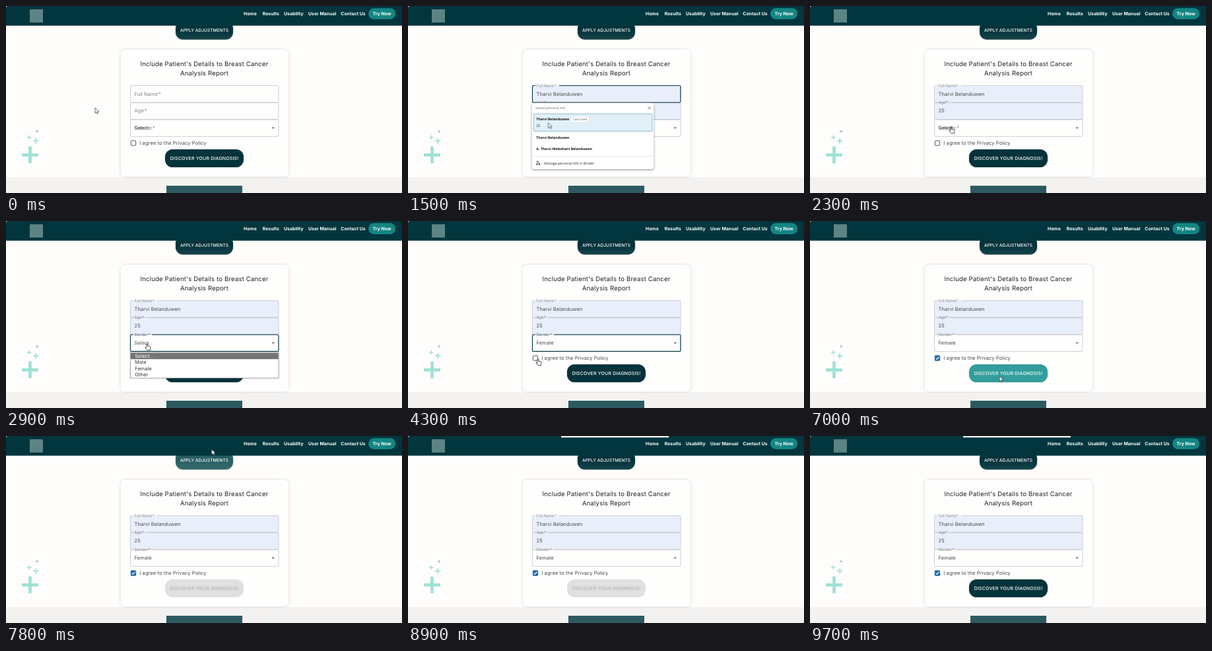
Write an HTML page that moves like this. It is 600 px wide and 283 px high and loops after 9800 ms.

```html
<!DOCTYPE html>
<html lang="en">
<head>
<meta charset="utf-8">
<title>Patient details form</title>
<style>
html, body { margin: 0; width: 100%; height: 100%; overflow: hidden; background: #fefdfb; }
svg { display: block; width: 600px; height: 283px; font: 7.6px Inter, sans-serif; text-rendering: geometricPrecision; }
.nav { font-size: 6.9px; font-weight: 700; fill: #fff; }
.title { font-size: 9.6px; letter-spacing: .16px; text-anchor: middle; fill: #222; }
.btn { text-anchor: middle; font-weight: 500; fill: #fff; }
.soft { filter: drop-shadow(0 .6px .8px #0004); }
.value { fill: #4c4c4c; letter-spacing: .06px; }
.line { fill: none; stroke: #c2c4ca; stroke-width: .8; }
.ring { fill: none; stroke: #0b3c45; stroke-width: 1.15; }
.label { fill: #858585; }
.saved { font: 5.2px "Open Sans", sans-serif; fill: #222; }
.saved .b { font-weight: 700; fill: #111; }

/* 1% of the loop is 98 ms */
.t { animation: 9.8s step-end infinite; opacity: 0; }
.name-empty { animation-name: nameEmpty; }
.name-focus { animation-name: nameFocus; }
.filled { animation-name: filled; }
.age-empty { animation-name: ageEmpty; }
.hover-row { animation-name: hoverRow; }
.popup { animation-name: nameFocus; }
.sex-empty { animation-name: sexEmpty; }
.sex-focus { animation-name: sexFocus; }
.select { animation-name: selectText; }
.female { animation-name: femaleText; }
.menu { animation-name: menu; }
.checked { animation-name: checked; }
.tab { animation-name: tab; }
.arrow { animation-name: arrow; }
.hand { animation-name: hand; }
.beam { animation-name: beam; }
@keyframes nameEmpty { 0% { opacity: 1 } 9.18%, 100% { opacity: 0 } }
@keyframes nameFocus { 0% { opacity: 0 } 9.18% { opacity: 1 } 21.43%, 100% { opacity: 0 } }
@keyframes filled { 0% { opacity: 0 } 11.73%, 100% { opacity: 1 } }
@keyframes ageEmpty { 0% { opacity: 1 } 11.73%, 100% { opacity: 0 } }
@keyframes hoverRow { 0% { opacity: 0 } 11.73% { opacity: 1 } 21.43%, 100% { opacity: 0 } }
@keyframes sexEmpty { 0% { opacity: 1 } 25.5%, 100% { opacity: 0 } }
@keyframes sexFocus { 0% { opacity: 0 } 25.5% { opacity: 1 } 46.94%, 100% { opacity: 0 } }
@keyframes selectText { 0% { opacity: 1 } 36.7%, 100% { opacity: 0 } }
@keyframes femaleText { 0% { opacity: 0 } 36.7%, 100% { opacity: 1 } }
@keyframes menu { 0% { opacity: 0 } 25.5% { opacity: 1 } 36.7%, 100% { opacity: 0 } }
@keyframes checked { 0% { opacity: 0 } 46.94%, 100% { opacity: 1 } }
@keyframes tab { 0% { opacity: 0 } 85.7%, 100% { opacity: 1 } }
@keyframes arrow {
  0% { opacity: 1 } 5.9% { opacity: 0 } 10.1% { opacity: 1 } 21.43% { opacity: 0 }
  31.8% { opacity: 1 } 41% { opacity: 0 } 48% { opacity: 1 } 49.9% { opacity: 0 }
  71.4% { opacity: 1 } 78.4% { opacity: 0 } 79.3%, 100% { opacity: 1 }
}
@keyframes hand {
  0% { opacity: 0 } 21.43% { opacity: 1 } 31.8% { opacity: 0 } 41% { opacity: 1 }
  48% { opacity: 0 } 49.9% { opacity: 1 } 71.4% { opacity: 0 } 78.4% { opacity: 1 } 79.3%, 100% { opacity: 0 }
}
@keyframes beam { 0% { opacity: 0 } 5.9% { opacity: 1 } 10.1%, 100% { opacity: 0 } }

/* highlighted menu row */
.mark { animation: mark 9.8s step-end infinite; }
@keyframes mark {
  0% { transform: none } 32.6% { transform: translateY(9.4px) } 33.7%, 100% { transform: translateY(18.8px) }
}

/* floating labels */
.label text { animation: 9.8s linear infinite; }
.label .l-name { animation-name: lName; }
.label .l-age { animation-name: lAge; }
.label .l-sex { animation-name: lSex; }
@keyframes lName {
  0%, 9.18% { transform: none } 11%, 100% { transform: translateY(-13.4px) scale(.76) }
}
@keyframes lAge {
  0%, 11.7% { transform: none } 13%, 100% { transform: translateY(-13.4px) scale(.76) }
}
@keyframes lSex {
  0%, 25.5% { transform: none; fill: #858585 }
  27.5%, 46.9% { transform: translateY(-13.4px) scale(.76); fill: #4a5f64 }
  48%, 100% { transform: translateY(-13.4px) scale(.76); fill: #858585 }
}

.apply { animation: apply 9.8s linear infinite; }
@keyframes apply { 0%, 78.2% { fill: #04333b } 79.4% { fill: #2c6266 } 81.6%, 100% { fill: #04333b } }
.go { animation: go 9.8s linear infinite; }
@keyframes go {
  0%, 49.9% { fill: #04333b } 52.4%, 71.4% { fill: #2f9c9b }
  74%, 95.9% { fill: #e0e0df } 98.4%, 100% { fill: #04333b }
}
.go-text { animation: goText 9.8s linear infinite; }
@keyframes goText { 0%, 71.4% { fill: #fff } 74%, 95.9% { fill: #b3b3b2 } 98.4%, 100% { fill: #fff } }
.go-shade { animation: goShade 9.8s linear infinite; }
@keyframes goShade { 0%, 71.4% { opacity: 1 } 74%, 95.9% { opacity: 0 } 98.4%, 100% { opacity: 1 } }

.pointer { animation: move 9.8s linear infinite; }
@keyframes move {
  0% { transform: translate(135px, 154px) }
  2.5% { transform: translate(137px, 153px) }
  7% { transform: translate(205px, 138px) }
  8.5%, 9.7% { transform: translate(214px, 136px) }
  11.7% { transform: translate(213px, 170px) }
  13%, 21.4% { transform: translate(212.5px, 176.5px) }
  24.5%, 30.2% { transform: translate(213px, 185px) }
  34.5% { transform: translate(211px, 220px) }
  37% { transform: translate(211px, 221px) }
  42%, 47.2% { transform: translate(196px, 208px) }
  50.5% { transform: translate(256px, 230px) }
  57%, 73% { transform: translate(287px, 234.5px) }
  78% { transform: translate(305px, 60px) }
  79.6% { transform: translate(311.5px, 20px) }
  81.3%, 100% { transform: translate(318px, -20px) }
}
</style>
</head>
<body>
<svg viewBox="0 0 600 283">
  <defs>
    <path id="name" d="M229 120.5H411.5Q413 120.5 413 122V144.5Q413 146 411.5 146H190Q188.5 146 188.5 144.5V122Q188.5 120.5 190 120.5H193"/>
    <path id="age" d="M213 146.3H411.5Q413 146.3 413 147.8V170.2Q413 171.7 411.5 171.7H190Q188.5 171.7 188.5 170.2V147.8Q188.5 146.3 190 146.3H193"/>
    <path id="sex" d="M221 172H411.5Q413 172 413 173.5V195.9Q413 197.4 411.5 197.4H190Q188.5 197.4 188.5 195.9V173.5Q188.5 172 190 172H193"/>
    <linearGradient id="sheen" x2="0" y2="1">
      <stop offset=".5" stop-color="#fff" stop-opacity="0"/>
      <stop offset="1" stop-color="#fff" stop-opacity=".08"/>
    </linearGradient>
  </defs>

  <rect width="600" height="283" fill="#fefdfb"/>
  <rect y="259" width="600" height="24" fill="#f3f2f1"/>
  <rect x="243" y="272" width="115" height="115" fill="#2c5a60"/>

  <g fill="none" stroke="#a0e2d5">
    <path d="M24 225.3H49M36.5 212.6V238" stroke-width="4.8"/>
    <path d="M41 204.2H49.5M45.2 200V208.5" stroke-width="1.8"/>
    <path d="M32 198.8H38.6M35.3 195.5V202.1" stroke-width="1.5"/>
    <path d="M45 189.8H49.4M47.2 187.6V192" stroke="#a3b5b3"/>
  </g>

  <g class="soft">
    <rect class="apply" x="257" y="23" width="87" height="27.8" rx="11"/>
    <rect x="257" y="23" width="87" height="27.8" rx="11" fill="url(#sheen)"/>
  </g>
  <text class="btn" x="300.5" y="39.3" font-size="6.6">APPLY ADJUSTMENTS</text>

  <path d="M0 3Q0 0 3 0H600V29.7H0Z" fill="#01363e"/>
  <rect x="36" y="5" width="20" height="20" fill="#5c8484"/>
  <g class="nav">
    <text x="360" y="14">Home</text>
    <text x="388.8" y="14">Results</text>
    <text x="421" y="14">Usability</text>
    <text x="458" y="14">User Manual</text>
    <text x="507.3" y="14">Contact Us</text>
    <rect x="549" y="3.2" width="41.3" height="16.8" rx="8.4" fill="#138683"/>
    <text x="569.6" y="14" text-anchor="middle">Try Now</text>
  </g>
  <rect class="t tab" x="232" width="163" height="2.3" fill="#f0f0f0"/>

  <rect x="173.5" y="66" width="255" height="192.3" rx="7" fill="#fefefd" style="filter:drop-shadow(0 .5px 1.5px #0003)"/>
  <text class="title" x="300.5" y="90.8">Include Patient's Details to Breast Cancer</text>
  <text class="title" x="300.5" y="105.4">Analysis Report</text>

  <rect class="t filled" x="188.5" y="120.5" width="224.5" height="51.2" rx="1.5" fill="#e8eefa"/>
  <g class="line">
    <use href="#name"/><use href="#age"/><use href="#sex"/>
    <path class="t name-empty" d="M193 120.5H229"/>
    <path class="t age-empty" d="M193 146.3H213"/>
    <path class="t sex-empty" d="M193 172H221"/>
  </g>
  <use class="t ring name-focus" href="#name"/>
  <use class="t ring sex-focus" href="#sex"/>
  <g class="label">
    <g transform="translate(194.5 135.7)"><text class="l-name">Full Name<tspan dx="1">*</tspan></text></g>
    <g transform="translate(194.5 161.4)"><text class="l-age">Age<tspan dx="1">*</tspan></text></g>
    <g transform="translate(194.5 187.2)"><text class="l-sex">Gender<tspan dx="1">*</tspan></text></g>
  </g>
  <g class="value">
    <text class="t filled" x="194.5" y="135.5">Tharvi Belanduwen</text>
    <text class="t filled" x="194.5" y="161.4">25</text>
    <text class="t select" x="194.5" y="187.2" font-size="7.3">Select...</text>
    <text class="t female" x="194.5" y="187.2">Female</text>
    <text x="202.3" y="210">I agree to the Privacy Policy</text>
  </g>
  <path d="M402.5 183.6H407.1L404.8 186Z" fill="#666"/>

  <rect x="189.4" y="203.9" width="7.2" height="7.2" rx=".8" fill="#fff" stroke="#555"/>
  <g class="t checked">
    <rect x="188.9" y="203.4" width="8.2" height="8.2" rx="1" fill="#1b6fb8"/>
    <path d="M190.7 207.6L192.3 209.2L195.6 205.6" fill="none" stroke="#fff" stroke-width="1.1"/>
  </g>

  <g class="go-shade"><rect class="soft" x="241.5" y="217.5" width="118" height="26.3" rx="11" fill="#04333b"/></g>
  <rect class="go" x="241" y="217" width="119" height="27" rx="11.5"/>
  <text class="btn go-text" x="300.7" y="232.9" font-size="7" letter-spacing=".18">DISCOVER YOUR DIAGNOSIS!</text>

  <g class="t menu">
    <rect class="soft" x="188.7" y="199.2" width="224.3" height="38.6" fill="#fff" stroke="#888" stroke-width=".6"/>
    <rect class="mark" x="189" y="199.7" width="223.7" height="9.4" fill="#757575"/>
    <g fill="#333" font-size="7.4" letter-spacing=".08">
      <text x="195.3" y="207" fill="#fff">Select...</text>
      <text x="195.3" y="216.3">Male</text>
      <text x="195.3" y="225.7">Female</text>
      <text x="195.3" y="235">Other</text>
    </g>
  </g>

  <g class="t popup saved">
    <rect x="187.5" y="146.8" width="185" height="100.2" rx="3.5" fill="#fff" style="filter:drop-shadow(0 1px 1.5px #0007)"/>
    <text x="193.3" y="156.2" font-size="4.9" fill="#666">Saved personal info</text>
    <path d="M363.7 152.4L367.7 156.4M367.7 152.4L363.7 156.4" stroke="#444" stroke-width=".7"/>
    <rect class="t hover-row" x="190.4" y="163.3" width="179.6" height="26.2" rx="1" fill="#e1f0f8" stroke="#72aecb" stroke-width=".8"/>
    <text class="b" x="194.3" y="173.3">Tharvi Belanduwen</text>
    <rect x="247" y="167" width="27.6" height="9" rx="4.5" fill="#fff" stroke="#ddd" stroke-width=".5"/>
    <text x="260.8" y="173.2" font-size="4.6" text-anchor="middle" fill="#555">Last Used</text>
    <text x="194.3" y="183">25</text>
    <text class="b" x="194.3" y="200.7">Tharvi Belanduwen</text>
    <text class="b" x="194.3" y="218.3">A. Tharvi Meloshani Belanduwen</text>
    <path d="M188 227.5H372" stroke="#dedede" stroke-width=".7"/>
    <g fill="none" stroke="#333" stroke-width=".8">
      <circle cx="196.4" cy="235.9" r="1.4"/>
      <path d="M197 240.4H194.2Q193.9 238.6 195.6 238.5H197"/>
      <circle cx="199" cy="239.3" r="1" fill="#333"/>
    </g>
    <text x="206" y="239.7">Manage personal info in Binder</text>
  </g>

  <g class="pointer" stroke-linejoin="round">
    <path class="t arrow" d="M0 0V8.2L1.9 6.5L3.1 9.3L4.5 8.7L3.3 6H5.7Z" fill="#fff" stroke="#222" stroke-width=".65"/>
    <path class="t hand" d="M0 .8Q.8 -.3 1.6 .8V4L5 4.7Q6.1 5 6 6.2L5.4 10.5H1.1L-1.9 7Q-2 5.8 -.9 5.9L0 6.6Z" fill="#fff" stroke="#222" stroke-width=".8"/>
    <path class="t beam" d="M-1.5 -4H1.5M0 -4V4M-1.5 4H1.5" fill="none" stroke="#222" stroke-width=".8"/>
  </g>
</svg>
</body>
</html>
```
